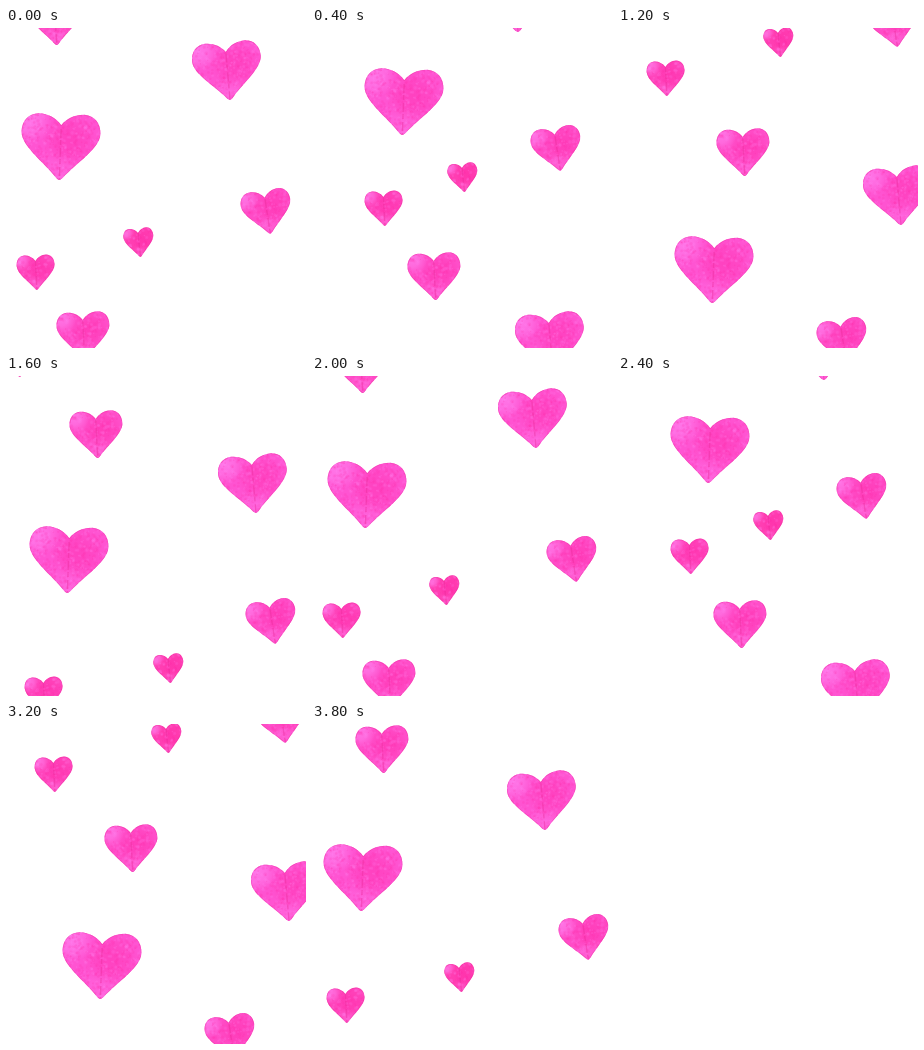
Recreate the animation shown at these times as an HTML page with a canvas. Size 300 by 320 pixels, loop 4 s.

```html
<!DOCTYPE html>
<html lang="en">
<head>
<meta charset="utf-8">
<title>Rising watercolour hearts</title>
<style>
html, body { margin: 0; width: 100%; height: 100%; overflow: hidden; background: #fff; }
canvas { display: block; }
</style>
</head>
<body>
<canvas id="stage" width="300" height="320"></canvas>
<script>
const W = 300, H = 320, STEP = 200, CYCLE = 10, PAD = 6;
const BLANK = 13; // one empty step in every second cycle
const ctx = document.getElementById('stage').getContext('2d');

// tilt in degrees; path keys are [step, centre x, top y]
const hearts = [
  { w: 79, h: 66, tilt: 2, path: [[4, 69, 285], [6, 96, 209], [9, 51, 121], [10, 55, 86], [12, 92, 41], [14, 77, -30]] },
  { w: 69, h: 58, tilt: -5, path: [[2, 239, 285], [4, 277, 213], [6, 281, 139], [9, 231, 48], [10, 222, 14]] },
  { w: 53, h: 47, tilt: -3, path: [[0, 78, 284], [4, 148, 165], [6, 126, 101], [9, 71, 2], [10, 50, -30]] },
  { w: 50, h: 44, tilt: -9, path: [[6, 225, 291], [9, 273, 192], [10, 261, 162], [14, 248, 36], [16, 276, -25]] },
  { w: 38, h: 35, tilt: -3, path: [[9, 34, 264], [10, 30, 227], [12, 72, 163], [14, 83, 100], [16, 48, 33]] },
  { w: 30, h: 29, tilt: -6, path: [[9, 148, 239], [10, 133, 200], [14, 178, 72], [16, 161, 0]] }
];

let seed = 7;
const random = () => (seed = seed * 16807 % 2147483647) / 2147483647;
const rgba = (rgb, alpha) => `rgba(${rgb.join()},${alpha})`;

function outline(w, h) {
  const path = new Path2D();
  for (const side of [w, -w]) {
    const curve = (...p) => path.bezierCurveTo(...p.map((v, i) => i % 2 ? (v - .5) * h : v * side));
    path.moveTo(0, -.33 * h);
    curve(.07, .06, .17, 0, .29, 0);
    curve(.42, .01, .5, .12, .5, .29);
    curve(.49, .51, .22, .72, .04, .97);
    curve(.02, .99, .01, 1, 0, 1);
    path.lineTo(0, -.33 * h);
  }
  return path;
}

function paint({ w, h, tilt }) {
  const canvas = document.createElement('canvas');
  canvas.width = w + 2 * PAD;
  canvas.height = h + 2 * PAD;
  const g = canvas.getContext('2d');
  const shape = outline(w, h);
  const depth = ((79 - w) / 49) ** 2; // small hearts are deeper in colour
  const pale = [255, 135, 243], deep = [255, 38, 165];

  const blot = (x, y, r, rgb, alpha) => {
    const wash = g.createRadialGradient(x, y, 0, x, y, r);
    wash.addColorStop(0, rgba(rgb, alpha));
    wash.addColorStop(.5, rgba(rgb, alpha * .7));
    wash.addColorStop(1, rgba(rgb, 0));
    g.fillStyle = wash;
    g.fillRect(x - r, y - r, 2 * r, 2 * r);
  };

  g.translate(PAD + w / 2, PAD + h / 2);
  g.rotate(tilt * Math.PI / 180);
  g.fillStyle = rgba([255, 84 - 22 * depth, 210 - 32 * depth], 1);
  g.fill(shape);
  g.clip(shape);
  blot(-.4 * w, -.38 * h, .28 * w, pale, .65);
  blot(0, .4 * h, .3 * w, pale, .3);
  blot(.12 * w, -.1 * h, .35 * w, deep, .4);

  // pigment grain
  for (let i = 0; i < w * h / 9; i++) {
    const x = (random() - .5) * w, y = (random() - .5) * h;
    blot(x, y, 1 + random() * 1.5, random() < .5 ? pale : deep, .2);
  }
  g.strokeStyle = rgba([232, 40, 150], .4);
  g.lineWidth = 1.4;
  g.setLineDash([5, 2, 9, 3]);
  g.stroke(shape);
  return canvas;
}

// smooth curve through the keys, running straight on beyond both ends
function place(path, step, axis) {
  const last = path.length - 1;
  const slope = i => (path[i + 1][axis] - path[i][axis]) / (path[i + 1][0] - path[i][0]);
  const tangent = i => {
    if (i === 0) return slope(0);
    if (i === last) return slope(last - 1);
    const before = path[i][0] - path[i - 1][0], after = path[i + 1][0] - path[i][0];
    return (slope(i - 1) * after + slope(i) * before) / (before + after);
  };
  const beyond = i => path[i][axis] + (step - path[i][0]) * tangent(i);
  if (step <= path[0][0]) return beyond(0);
  if (step >= path[last][0]) return beyond(last);
  const i = path.findIndex(key => key[0] > step) - 1;
  const span = path[i + 1][0] - path[i][0], t = (step - path[i][0]) / span;
  const ease = t * t * (3 - 2 * t);
  return path[i][axis] * (1 - ease) + path[i + 1][axis] * ease
    + span * t * (1 - t) * (tangent(i) * (1 - t) - tangent(i + 1) * t);
}

for (const heart of hearts) heart.image = paint(heart);

function frame() {
  const step = Math.floor(performance.now() / STEP) % (2 * CYCLE);
  ctx.fillStyle = '#fff';
  ctx.fillRect(0, 0, W, H);
  if (step !== BLANK) {
    for (const { w, path, image } of hearts) {
      for (const age of [step % CYCLE, step % CYCLE + CYCLE]) {
        const x = Math.floor(place(path, age, 1) - w / 2);
        const y = Math.round(place(path, age, 2));
        ctx.drawImage(image, x - PAD, y - PAD);
      }
    }
  }
  requestAnimationFrame(frame);
}
frame();
</script>
</body>
</html>
```
